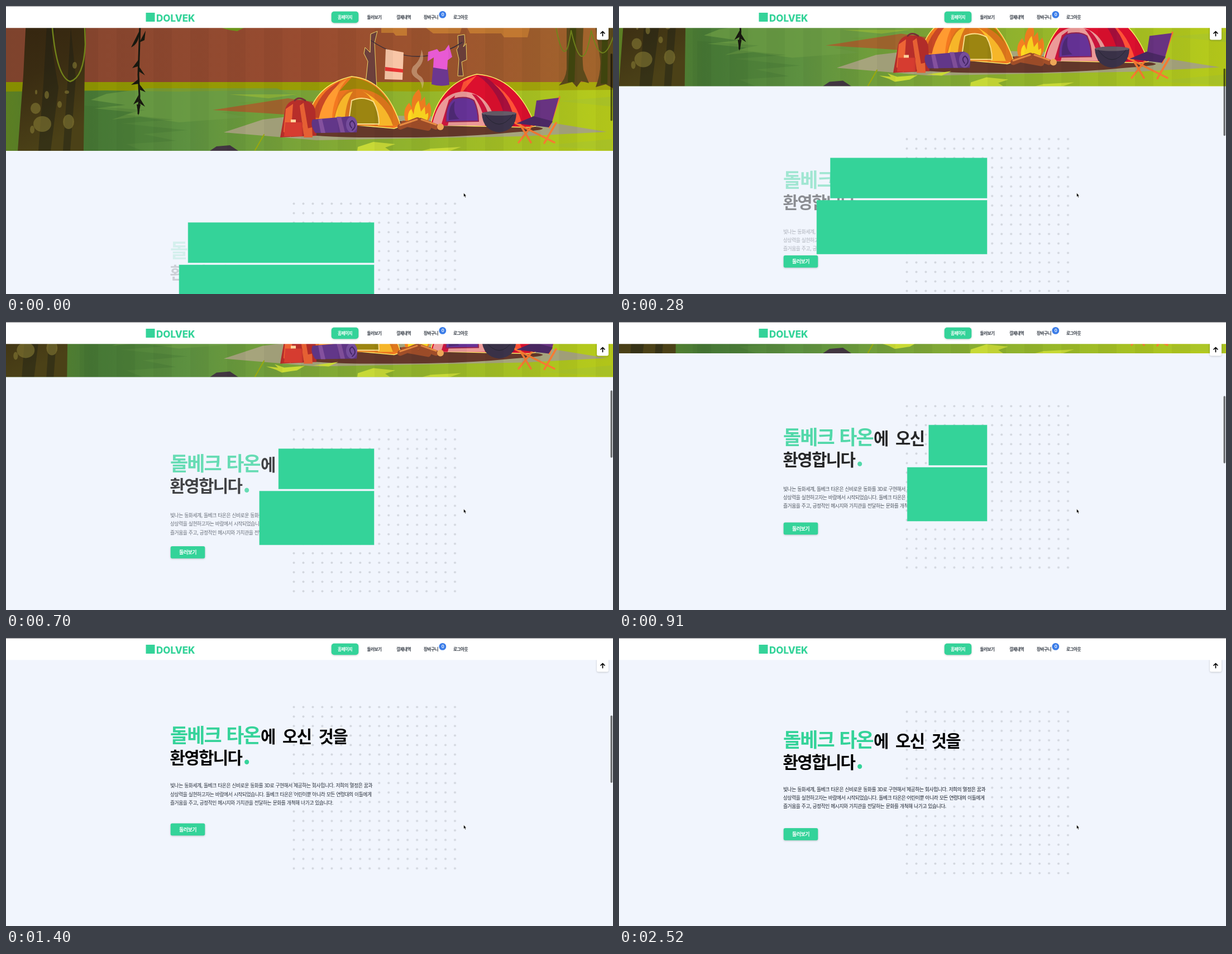
An HTML page for the animation above (2.66 s loop, 1087 by 515 pixels).

```html
<!DOCTYPE html>
<html lang="ko">
<head>
<meta charset="utf-8">
<style>
html, body { margin: 0; width: 100%; height: 100%; overflow: hidden; background: #f1f5fd; }
svg { display: block; width: 1087px; height: 515px; }
text { font-family: "Noto Sans CJK KR", "Noto Sans KR", sans-serif; letter-spacing: -.056em; word-spacing: .05em; }
.green { fill: #34d399; }
.name { font-size: 35px; font-weight: 700; }
.head { font-size: 29.8px; font-weight: 700; word-spacing: 6.5px; }
.body { font-size: 8.8px; font-weight: 500; fill: #1c232e; }
.nav { font-size: 7.6px; font-weight: 600; fill: #333a44; text-anchor: middle; }
.btn { font-size: 9px; font-weight: 700; fill: #fff; text-anchor: middle; }
.soft { filter: drop-shadow(0 1px 1.5px #0003); }
.cover { stroke: #34d399; stroke-opacity: .5; }
.line { fill: none; stroke-linecap: round; stroke-linejoin: round; }
</style>
</head>
<body>
<svg viewBox="0 0 1087 515">
<defs>
  <linearGradient id="wall"><stop stop-color="#83452f"/><stop offset=".5" stop-color="#994c30"/><stop offset=".75" stop-color="#9e562e"/><stop offset="1" stop-color="#a2662c"/></linearGradient>
  <linearGradient id="grass"><stop stop-color="#5f8424"/><stop offset=".14" stop-color="#497a36"/><stop offset=".3" stop-color="#5d9140"/><stop offset=".5" stop-color="#7da637"/><stop offset=".75" stop-color="#9cba27"/><stop offset="1" stop-color="#b8cc1a"/></linearGradient>
  <linearGradient id="hedge"><stop stop-color="#8b9200"/><stop offset="1" stop-color="#a8a90c"/></linearGradient>
  <linearGradient id="bark" x2=".25" y2="1"><stop stop-color="#33230f"/><stop offset=".5" stop-color="#3a2c12"/><stop offset="1" stop-color="#4b4117"/></linearGradient>
  <pattern id="bands" width="66" height="300" patternUnits="userSpaceOnUse"><path fill="#000" opacity=".035" d="M0 0h33v300H0z"/></pattern>
  <pattern id="dots" x="507" y="86" width="16.97" height="16.97" patternUnits="userSpaceOnUse"><circle cx="8.5" cy="8.5" r="2" fill="#d2d6de"/></pattern>
</defs>

<g id="scene">
  <path fill="url(#wall)" d="M0 0h1087v150H0z"/>
  <path fill="#c27831" d="M672 39h46v14h-20l-4-5h-22zM752 39h64l-3 10h-48zM826 39h112l-4 17h-42l-5-7h-56z"/>
  <path fill="#6f9819" d="M386 39h40l-12 6-14-2z"/>
  <path fill="url(#hedge)" d="M0 136h1087v26H0z"/>
  <path fill="url(#grass)" d="M0 153l180-2 130 2 180-3 250 3 347-3v113H0z"/>
  <path fill="#6e9e45" opacity=".7" d="M180 157l75-10h230l40 17-110 9 60 8-90 9 45 9-120 9-70-10-50 5 38-13-70-7 56-6-62-9z"/>
  <path fill="#37692f" opacity=".22" d="M140 178l110 8-40 8 90 9-95 7 120 12-80 7 60 12-90 6 30 12H140z"/>
  <path fill="#a6c433" opacity=".5" d="M400 158h120l-50 7zM990 170l97-8v18zM955 250l130-12v20z"/>
  <g id="forest">
    <path fill="#5c4a1b" d="M1004 39h30q-3 55 0 75l10 24-14-4-8 11-8-9-24 6q12-10 14-29zM1056 39h31v108l-13-7-18 5q10-26 8-50z"/>
    <path fill="#41460f" d="M1010 39h11l-3 97h-12zM1068 39h10l-1 100h-12z"/>
    <path class="line" stroke="#72851c" stroke-width="2" d="M985 39q16 82 27 5q21 92 36 0q18 73 39 12"/>
  </g>

  <path fill="#a1662e" d="M370 186l135-21 60 8 30 15-35 10-90-6z"/>
  <path fill="#a6a47c" d="M390 226l70-23 88-10 380 8 148 24-150 8-370 7z"/>
  <path fill="#65382a" d="M508 226q55-20 190-20 160-2 250 10 40 5-40 10-100 10-230 9-120 1-170-9z"/>
  <path fill="#c7d936" d="M630 252l28-9 39 4-18 6 9 6h-59zM760 255l55-3-20 7h-50z"/>
  <path id="blades" fill="#cadb35" d="M466 240l21 2-6-6 17 6 37-3-14 8-27 4-10-5zM550 238l45-6-17 8z"/>
  <path class="line" stroke="#9ba90c" stroke-width="2" d="M446 258l16-28"/>
  <path fill="#423641" d="M365 259l12-8 24-2 15 10z"/>

  <!-- washing line -->
  <path fill="#6d403c" stroke="#f3d96b" d="M643 147l5-48-7-14 2-11 9 9 1-33 12-5-5 21 4 81zM809 53l12-2 1 14-3 8 5-6 1 29-9 4 3 25h-10l2-30-4-17 3-5z"/>
  <path class="line" stroke="#3c303a" stroke-width="1.5" d="M654 62q82 55 163 3"/>
  <path fill="#f8c6a7" d="M680 77l32 6-2 49-32-1z"/><path fill="#e83332" d="M679 109l32 4v6l-32-3z"/>
  <path fill="#6c378f" d="M765 107l26 3 3 31q-16 4-32-1z"/>
  <path fill="#e85ad4" d="M756 82l16-5 4 5 10-3 7-10 6 22-8 6-1 17-25-4 1-18-11 7z"/>

  <!-- left tent -->
  <path fill="#f47820" stroke="#fff06b" stroke-width="1.5" d="M539 205q13-64 80-79 62 5 88 89l-12 4z"/>
  <path fill="#a18709" d="M619 128q50 5 76 62-44-50-98-38z"/>
  <path fill="#c94825" d="M548 199q11-45 51-65-22 28-26 68z"/>
  <path fill="#ff9b31" d="M560 202q10-48 52-73-27 31-28 73z"/>
  <path fill="#df771c" d="M584 214q11-66 42-66 58 0 80 66z"/>
  <path fill="#ffbd2a" d="M586 214q9-57 35-61-14 20-15 61zM638 152q41 20 55 62h-27q-1-48-28-62z"/>
  <path fill="#9c8511" stroke="#ffe28d" stroke-width="2" d="M613 211l6-42q20-9 39 2 10 18 10 40z"/>

  <!-- right tent -->
  <path fill="#dc102e" stroke="#fff06b" stroke-width="1.5" d="M760 213q17-75 83-91 73 5 105 93l-12 2z"/>
  <path fill="#ff5236" d="M819 136l24-12q-34 37-35 48zM862 132q46 23 62 78h-14q-9-48-48-78z"/>
  <path fill="#a70f3c" d="M843 123l18 5q47 36 50 86h-15q-9-62-53-91z"/>
  <path fill="#ec9a98" d="M763 214q12-60 57-61 46 3 58 61z"/>
  <path fill="#cb153d" d="M779 214l14-46 11-8-13 54zM842 159q22 19 26 55h-10q-4-34-24-57z"/>
  <path fill="#673398" stroke="#96234d" stroke-width="2" d="M788 207q-1-31 13-41 24-6 37 3 8 17 8 37z"/>
  <path fill="#4f2a76" d="M793 204q-1-26 11-34-5 23 8 32z"/>

  <!-- fire -->
  <path fill="#e8c7a5" opacity=".5" d="M744 78q8 19-5 32-8 9 4 16 9 8 2 22 0-13-9-18-15-9-7-22 14-11 15-30z"/>
  <path fill="#f58120" d="M716 208q-8-21 6-35l5 9q-3-21 12-33 7 10 3 22l8-9 2 17 6-7q9 22-6 38z"/>
  <path fill="#ffd91f" d="M720 206q-2-16 6-22l4 10q1-17 9-25l4 20 7-9 1 14 5-3q2 13-8 19z"/>
  <path class="line" stroke="#a14e29" stroke-width="10" d="M706 216l31-12M742 205l28 11M712 210l44 8"/>
  <path class="line" stroke="#e88b41" stroke-width="3" d="M706 213l30-10M744 203l26 9"/>
  <circle cx="778" cy="216" r="6" fill="#eda657"/>

  <!-- pot and chair -->
  <path fill="#3b334a" d="M852 192q30-8 62 0-1 31-31 34-29-3-31-34z"/>
  <ellipse cx="883" cy="192" rx="31" ry="4" fill="#665b68"/>
  <path class="line" stroke="#272633" d="M858 194q25 35 50 0"/>
  <path class="line" stroke="#f77a32" stroke-width="3.5" d="M991 163l-18 54M912 209l70 35M918 244l27-34M964 245l21-36M920 211l20 33"/>
  <path fill="#683381" d="M950 169l40-5-13 46-33-1z"/><path fill="#4b2864" d="M914 210l31-13 34 9-7 11z"/>

  <!-- bag and mat -->
  <path fill="#b72e2a" d="M491 235l9-51q5-16 22-16 30-1 32 21l2 43z"/>
  <path class="line" stroke="#793039" stroke-width="3" d="M517 169q7-8 19 0"/>
  <path fill="#ed6435" d="M497 225l4-41 13-9-4 59zM535 220l13-3 1 18h-16zM526 178l7-5 8 47-8 10z"/>
  <path fill="#d63c30" d="M500 208h31v25h-33z"/><path fill="#ffd39c" d="M510 203h9v5h-9z"/>
  <path fill="#623789" d="M549 203l69-6q14 7 10 29l-74 1q-10-14-5-24z"/>
  <path fill="#84519e" d="M566 202l6 25h-8l-5-24zM600 198l7 28h-8l-7-28z"/>
  <ellipse cx="619" cy="212" rx="10" ry="14" fill="#7950a1"/><path class="line" stroke="#47286a" stroke-width="2" d="M619 218q-7-9 1-13 10 9 0 17"/>

  <path fill="url(#bands)" d="M0 0h1087v259H0z"/>

  <g id="tree">
    <path fill="url(#bark)" d="M37 0h107l-3 110-2 149H21l10-135z"/>
    <path fill="#171c15" opacity=".4" d="M75 0h20l-13 74 12 72-14 113H58l9-120zM116 39l9 90-10 130h-13l8-120z"/>
    <g fill="#857a34" opacity=".6"><ellipse cx="53" cy="183" rx="9" ry="10"/><ellipse cx="65" cy="211" rx="16" ry="14"/><ellipse cx="112" cy="207" rx="10" ry="13"/><ellipse cx="96" cy="176" rx="4" ry="6"/><ellipse cx="123" cy="106" rx="4" ry="6"/><ellipse cx="73" cy="159" rx="4" ry="7"/><ellipse cx="54" cy="154" rx="2" ry="4"/><ellipse cx="109" cy="154" rx="4" ry="3"/><ellipse cx="47" cy="221" rx="4" ry="7"/></g>
    <path class="line" stroke="#71831a" stroke-width="2.5" d="M83 39q8 89 32 96 24-7 27-66l-1-30"/>
    <path class="line" stroke="#17180f" stroke-width="3" d="M240 35l-3 88 2 38-2 31"/>
    <path fill="#17180f" d="M239 44l-15 30q15-7 15-30zM239 65l11-21-2 17zM238 95l-12 16 10-3zM238 108l11 16-11-7zM238 130l-14 11 14-2zM239 140l11 14-10-4zM238 158l-10 18 9-5zM238 162l11 18-10-6zM234 176l3 20 4-20z"/>
  </g>
</g>

<g id="page">
  <path fill="#f1f5fd" d="M0 0h1087v700H0z"/>
  <path fill="url(#dots)" d="M507 86h305.5v305.5H507z"/>
  <g id="title">
    <text class="name green" x="294" y="157">돌베크 타온</text>
    <text class="head" x="456" y="157">에 오신 것을</text>
    <text class="head" x="293.5" y="195">환영합니다</text>
    <text class="green" x="424" y="195" font-size="44" font-weight="700">.</text>
  </g>
  <g id="copy" class="body">
    <text x="294" y="236">빛나는 동화세계, 돌베크 타온은 신비로운 동화를 3D로 구현해서 제공하는 회사입니다. 저희의 열정은 꿈과</text>
    <text x="294" y="251.4">상상력을 실현하고자는 바람에서 시작되었습니다. 돌베크 타온은 어린이뿐 아니라 모든 연령대의 이들에게</text>
    <text x="294" y="266.8">즐거움을 주고, 긍정적인 메시지와 가치관을 전달하는 문화를 개척해 나가고 있습니다.</text>
  </g>
  <rect class="green soft" x="294.7" y="302.5" width="61.6" height="21.7" rx="3"/>
  <text class="btn" x="325.5" y="316.8">둘러보기</text>
  <rect id="cover1" class="green cover" y="128.3" height="71.7"/>
  <rect id="cover2" class="green cover" y="204" height="96"/>
  <path class="green" d="M0 486h1087v200H0z"/>
</g>

<rect class="soft" x="1058" y="36" width="21" height="24.5" rx="3" fill="#fff"/>
<path class="line" stroke="#000" stroke-width="1.7" d="M1068.5 53.5v-8M1065 49l3.5-3.5 3.5 3.5"/>
<rect id="bar" x="1082.5" width="3.5" height="120.5" rx="1.75"/>

<path fill="#fff" d="M0 0h1087v39.3H0z"/>
<path fill="#8b8b8d" d="M0 0h1087v1H0z"/>
<rect class="green" x="250.5" y="12" width="16" height="16"/>
<text class="green" x="269" y="28" style="font:800 17px Inter,sans-serif;letter-spacing:0">DOLVEK</text>
<rect class="green soft" x="582.7" y="9.8" width="48.6" height="20.4" rx="5"/>
<g class="nav">
  <text x="607" y="22.7" fill="#fff">홈페이지</text>
  <text x="659.5" y="22.7">둘러보기</text>
  <text x="712" y="22.7">결제내역</text>
  <text x="761" y="22.7">장바구니</text>
  <text x="814" y="22.7">로그아웃</text>
</g>
<circle cx="781.8" cy="15.4" r="6.4" fill="#3b7de8"/>
<text x="782" y="18.1" fill="#fff" text-anchor="middle" style="font:600 7.5px Inter,sans-serif">0</text>
<path fill="#000" stroke="#fff" stroke-width=".6" d="M819.5 334.3v7l1.6-1.4 1.1 2.6 1.4-.6-1.1-2.5h2z"/>
</svg>

<script>
const LOOP = 2660, STEP = 70, TOP = 259, RIGHT = 659, WIDTH = 365;
const el = id => document.getElementById(id);
const clamp = v => Math.min(1, Math.max(0, v));

// Linear interpolation through [time, value] points
function track(points, t) {
  const i = points.findIndex(p => p[0] > t);
  if (i < 0) return points[points.length - 1][1];
  const [t0, a] = points[i - 1], [t1, b] = points[i];
  return a + (b - a) * (t - t0) / (t1 - t0);
}

const scroll = [[0, 259], [140, 185], [280, 143.5], [420, 127], [560, 121], [740, 92], [910, 56],
  [1050, 35], [1190, 23], [1330, 25], [1470, 33], [1610, 37], [1750, 37.5]];
const titleIn = [[0, .15], [280, .42], [560, .65], [910, .84], [1190, .96], [1540, 1]];
const copyIn = [[0, .09], [280, .325], [560, .56], [910, .76], [1190, .91], [1750, 1]];

function rise(id, p) {
  el(id).setAttribute("transform", `translate(0 ${40 * (1 - p)})`);
  el(id).setAttribute("opacity", p);
}

function cover(id, start, t) {
  const w = WIDTH * (1 - clamp(start + .00065 * t) ** 1.6);
  el(id).setAttribute("x", RIGHT - w);
  el(id).setAttribute("width", w);
}

function draw() {
  const t = Math.floor(performance.now() % LOOP / STEP) * STEP;
  const y = track(scroll, t), moved = TOP - y;
  el("scene").setAttribute("transform", `translate(0 ${-moved})`);
  el("page").setAttribute("transform", `translate(0 ${y})`);
  el("tree").setAttribute("transform", `translate(${-.185 * moved} 0)`);
  el("blades").setAttribute("opacity", clamp(moved / 100));
  rise("title", track(titleIn, t));
  rise("copy", track(copyIn, t));
  cover("cover1", .219, t);
  cover("cover2", .142, t);
  el("bar").setAttribute("y", 85 + .2325 * moved);
  el("bar").setAttribute("opacity", .55 * clamp((2520 - t) / 210));
  requestAnimationFrame(draw);
}
draw();
</script>
</body>
</html>
```
